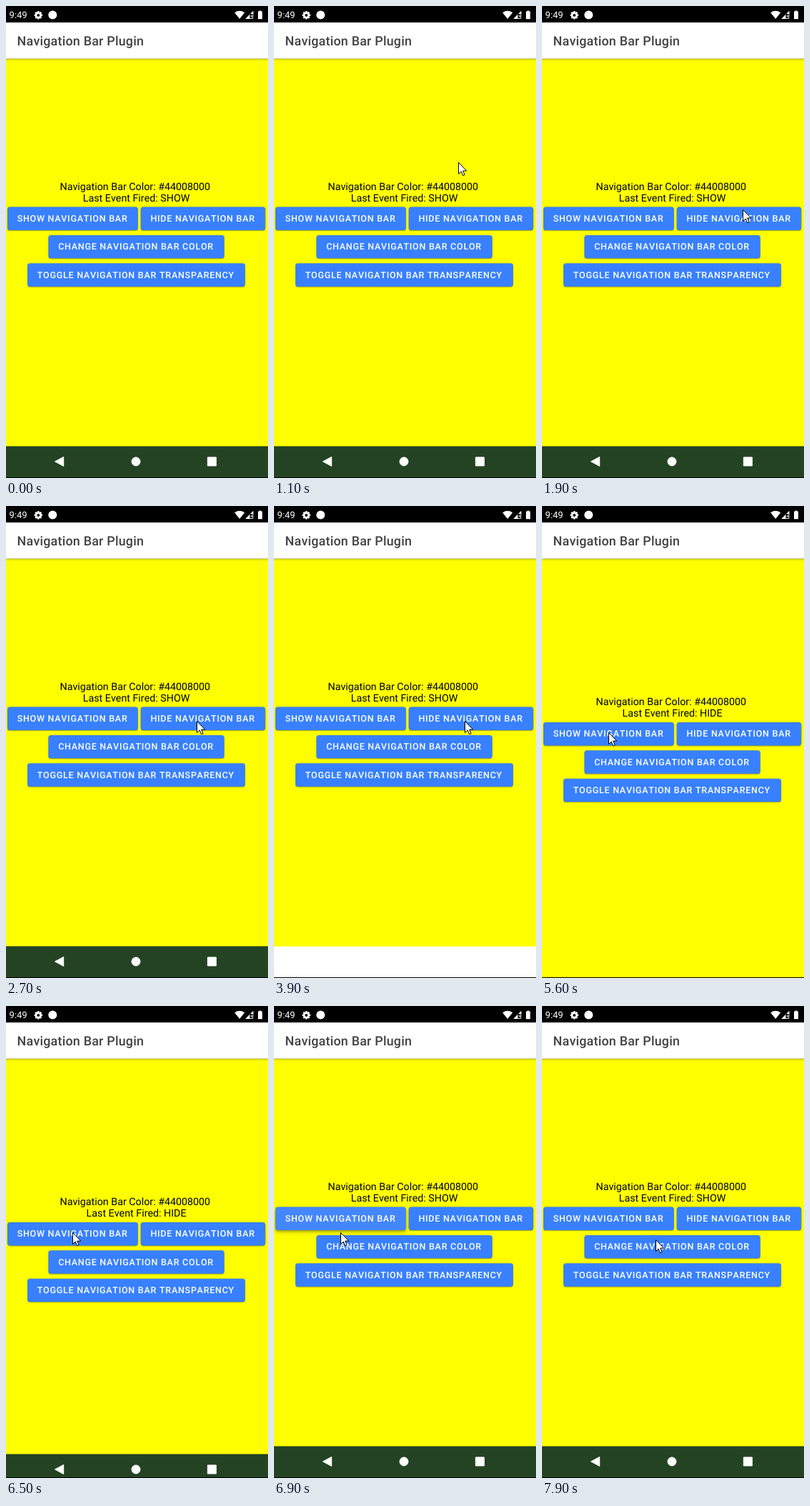
Animation of 367x659 px, one loop 8000 ms. Source, as an HTML page:

```html
<!DOCTYPE html>
<html lang="en">
<head>
<meta charset="utf-8">
<title>Navigation bar demo</title>
<style>
  html, body { margin: 0; width: 100%; height: 100%; overflow: hidden; background: #000; }
  svg { display: block; width: 367px; height: 659px; overflow: hidden; }
  text { font-family: Roboto, sans-serif; font-kerning: none; text-rendering: geometricPrecision; white-space: pre; }
  .clock { font-size: 13px; fill: #fff; }
  .title { font-size: 17.86px; font-weight: 500; letter-spacing: .0125em; fill: #424242; }
  .info { font-size: 14.28px; text-anchor: middle; fill: #000; }
  .label { font-size: 12.5px; font-weight: 500; letter-spacing: .06em; fill: #fff; }
  .button { fill: #3880ff; filter: drop-shadow(0 1.2px .7px rgba(0,0,0,.24)) drop-shadow(0 .8px 1.6px rgba(0,0,0,.18)); }
  .button.lit { fill: #4486ff; filter: drop-shadow(0 2px 1.5px rgba(0,0,0,.24)) drop-shadow(0 2.5px 3px rgba(0,0,0,.2)); }
</style>
</head>
<body>
<svg viewBox="0 0 367 659">
  <defs>
    <linearGradient id="shade" x1="0" y1="0" x2="0" y2="1">
      <stop offset="0" stop-opacity=".26"/>
      <stop offset=".45" stop-opacity=".1"/>
      <stop offset="1" stop-opacity="0"/>
    </linearGradient>
  </defs>
  <rect width="367" height="659" fill="#ff0"/>

  <rect width="367" height="23" fill="#000"/>
  <text class="clock" x="4.6" y="17.4">9:49</text>
  <g id="gear" fill="#fff" transform="translate(45.3 12.8)"></g>
  <circle cx="65.3" cy="12.6" r="6" fill="#fff"/>
  <path d="M327.2 18 320.2 9.2Q327.2 4.4 334.2 9.2Z" fill="#fff"/>
  <path d="M335.2 18 346.3 6.8V11H341.5V18Z" fill="#fff"/>
  <path d="M341 17.5H345.8V8M343 13l2.4 2.6M345.4 13l-2.4 2.6" fill="none" stroke="#fff" stroke-width=".9"/>
  <path d="M354.7 6.4h2.6v1.2h1.7v10.6h-6V7.6h1.7Z" fill="#fff"/>

  <rect y="23" width="367" height="50.7" fill="#fff"/>
  <rect y="73" width="367" height="4.5" fill="url(#shade)"/>
  <text class="title" x="15.6" y="54.8">Navigation Bar Plugin</text>

  <g id="content">
    <text class="info" x="180.8" y="256.5">Navigation Bar Color: #44008000</text>
    <text class="info" id="event" x="182.6" y="273"></text>
    <g id="buttons"></g>
  </g>

  <rect id="blank" y="615" width="367" height="43" fill="#fff"/>
  <g id="nav">
    <rect y="614.6" width="367" height="44" fill="#234323"/>
    <g fill="#fff" stroke="#fff" stroke-linejoin="round">
      <path d="M68.5 636 80.7 629.5V642.5Z"/>
      <circle cx="182" cy="636" r="6"/>
      <rect x="282.4" y="630" width="12" height="12"/>
    </g>
  </g>
  <rect y="658" width="367" height="1" fill="#000"/>

  <path id="cursor" d="M.5 .5V16.5L4.2 13 6.7 18.7 9.1 17.7 6.7 12.1H11.7Z"
        fill="#fff" stroke="#000" stroke-width="1" stroke-linejoin="round"/>
</svg>
<script>
const LOOP = 8000, STEP = 100;
const $ = id => document.getElementById(id);

// Cog: eight teeth around a ring
$('gear').innerHTML =
  '<circle r="3.2" fill="none" stroke="#fff" stroke-width="2.6"/>' +
  Array.from({ length: 8 }, (_, i) =>
    `<rect x="-1.3" y="-5.7" width="2.6" height="2" transform="rotate(${i * 45})"/>`).join('');

const buttons = [
  { text: 'SHOW NAVIGATION BAR', row: 0, x: 1.9, w: 183 },
  { text: 'HIDE NAVIGATION BAR', row: 0, x: 188.7, w: 174.6 },
  { text: 'CHANGE NAVIGATION BAR COLOR', row: 1, x: 59.4, w: 246.3 },
  { text: 'TOGGLE NAVIGATION BAR TRANSPARENCY', row: 2, x: 30, w: 305 }
];
$('buttons').innerHTML = buttons.map(({ text, row, x, w }) => {
  const y = 280.6 + row * 39.35;
  return `<rect class="button" x="${x}" y="${y}" width="${w}" height="32.4" rx="3.6"/>` +
    `<text class="label" x="${x + 13.75}" y="${y + 20.4}">${text}</text>`;
}).join('');
const [showRect, hideRect] = document.querySelectorAll('.button');

// Pointer stops: time, x, y, easing power on the way in
const stops = [
  [400, 40, 40, 1], [1100, 258, 218, 1.3], [1200, 270, 226, 1],
  [1700, 286, 264, 1], [2100, 278, 297, 1.3], [2200, 278, 297, 1],
  [2700, 267, 300, 1.2], [4800, 267, 300, 1], [5200, 107, 311, 1.3],
  [5300, 107, 311, 1], [5600, 93, 316, 1.2], [7300, 93, 316, 1],
  [7900, 159, 326, 1.2]
];

const easeOut = (p, power) => 1 - Math.pow(1 - p, power);
const within = (t, from, to) => t >= from && t < to;
const show = (el, on) => el.setAttribute('visibility', on ? 'visible' : 'hidden');

function pointerAt(t) {
  const i = stops.findIndex(s => s[0] > t);
  if (i < 0) return stops[stops.length - 1].slice(1, 3);
  const [t0, x0, y0] = stops[i - 1], [t1, x1, y1, power] = stops[i];
  const p = easeOut((t - t0) / (t1 - t0), power);
  return [x0 + (x1 - x0) * p, y0 + (y1 - y0) * p];
}

function render(t) {
  const hidden = within(t, 4200, 6900);
  $('content').setAttribute('transform', `translate(0 ${hidden ? 21.4 : 0})`);
  $('event').textContent = 'Last Event Fired: ' + (hidden ? 'HIDE' : 'SHOW');
  hideRect.classList.toggle('lit', within(t, 4200, 4300));
  showRect.classList.toggle('lit', within(t, 6900, 7100));

  show($('blank'), within(t, 3900, 4200));
  show($('nav'), !within(t, 3900, 6400));
  const rise = within(t, 6400, 6700) ? easeOut((t - 6300) / 400, 2) : 1;
  $('nav').setAttribute('transform', `translate(0 ${44 * (1 - rise)})`);

  show($('cursor'), t >= 400);
  if (t >= 400) {
    const [x, y] = pointerAt(t).map(Math.round);
    $('cursor').setAttribute('transform', `translate(${x} ${y})`);
  }
}

const start = performance.now();
function tick() {
  const t = (performance.now() - start) % LOOP;
  render(Math.floor(t / STEP) * STEP);
  requestAnimationFrame(tick);
}
tick();
</script>
</body>
</html>
```
